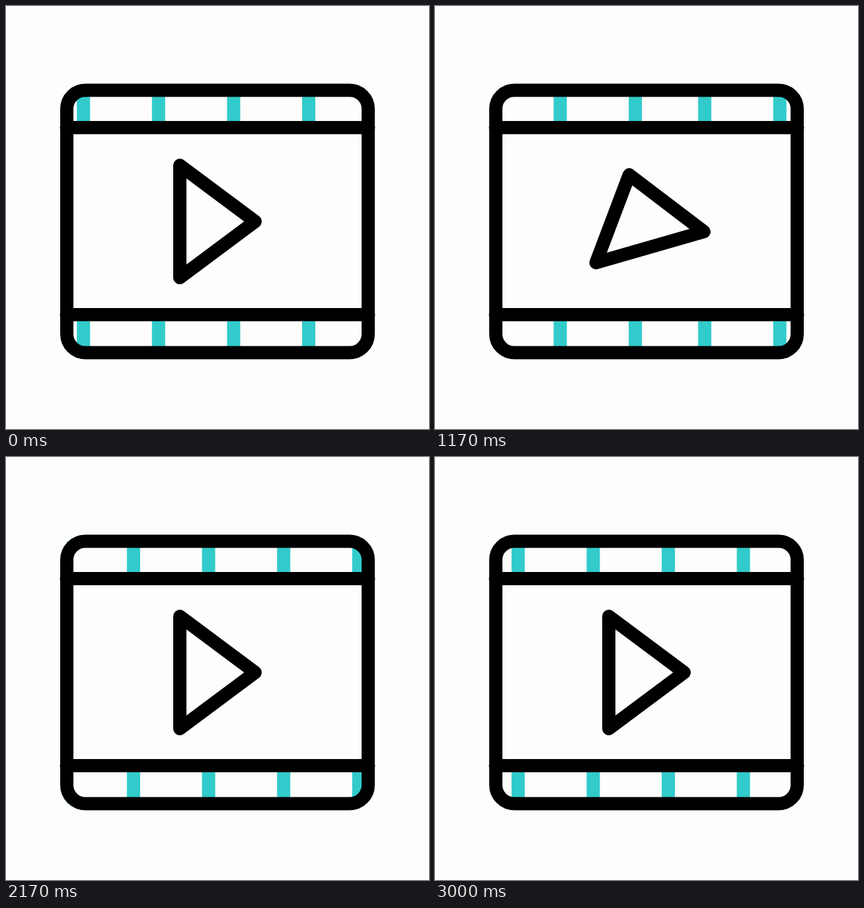
An HTML page with a canvas that plays this animation: 640x640 px, repeating every 3080 ms.

```html
<!DOCTYPE html>
<html lang="en">
<head>
<meta charset="utf-8">
<title>Film strip</title>
<style>
  html, body { margin: 0; width: 100%; height: 100%; overflow: hidden; background: #fdfdfc; }
  canvas { display: block; width: 100vmin; height: 100vmin; }
</style>
</head>
<body>
<canvas id="stage" width="640" height="640"></canvas>
<script>
const ctx = document.getElementById('stage').getContext('2d');

const LOOP = 3080;
const STEPS = 37;
const INK = '#000';
const TEAL = '#32cbcb';
const PAPER = '#fdfdfc';

// Film strip: groups of five bars with a slightly tighter seam between groups.
const BAR = { width: 20, gap: 113.6, count: 5, period: 559.4, start: 553 };
const SLIDE = { from: 11, length: 65 };
const SPIN = { from: 9.65, length: 30.2, x: 308.8, y: 322 };

const clamp01 = v => Math.min(1, Math.max(0, v));
const smooth = p => p * p * (3 - 2 * p);
const progress = (tick, { from, length }) => clamp01((tick - from) / length);

// Motion runs at 25 ticks per second, shown at 12 pictures per second.
function tickAt(ms) {
  const step = Math.min(STEPS - 1, Math.floor((ms + 5) * 12 / 1000));
  return Math.floor(step * 25 / 12 + 0.7);
}

function drawBars(tick) {
  const seam = BAR.start - BAR.period * progress(tick, SLIDE);
  ctx.save();
  ctx.beginPath();
  ctx.rect(92, 128, 456, 396);
  ctx.clip();
  ctx.fillStyle = TEAL;
  for (let group = -1; group <= 1; group++) {
    for (let i = 0; i < BAR.count; i++) {
      const x = seam + group * BAR.period + i * BAR.gap;
      ctx.fillRect(x, 128, BAR.width, 56);
      ctx.fillRect(x, 467, BAR.width, 57);
    }
  }
  ctx.restore();
}

function drawFrame() {
  ctx.beginPath();
  ctx.roundRect(92, 127.5, 456, 397, 28);
  for (const y of [184, 467]) {
    ctx.moveTo(91.5, y);
    ctx.lineTo(548.5, y);
  }
  ctx.stroke();
}

function drawPlay(tick) {
  ctx.save();
  ctx.translate(SPIN.x, SPIN.y);
  ctx.rotate(2 * Math.PI * smooth(progress(tick, SPIN)));
  ctx.translate(-SPIN.x, -SPIN.y);
  ctx.beginPath();
  ctx.moveTo(263, 241);
  ctx.lineTo(377, 326);
  ctx.lineTo(263, 411);
  ctx.closePath();
  ctx.stroke();
  ctx.restore();
}

function draw(ms) {
  const tick = tickAt(ms);
  ctx.fillStyle = PAPER;
  ctx.fillRect(0, 0, 640, 640);
  ctx.strokeStyle = INK;
  ctx.lineWidth = 20;
  ctx.lineCap = ctx.lineJoin = 'round';
  drawBars(tick);
  drawFrame();
  drawPlay(tick);
}

const begin = performance.now();
function loop() {
  draw((performance.now() - begin) % LOOP);
  requestAnimationFrame(loop);
}
loop();
</script>
</body>
</html>
```
